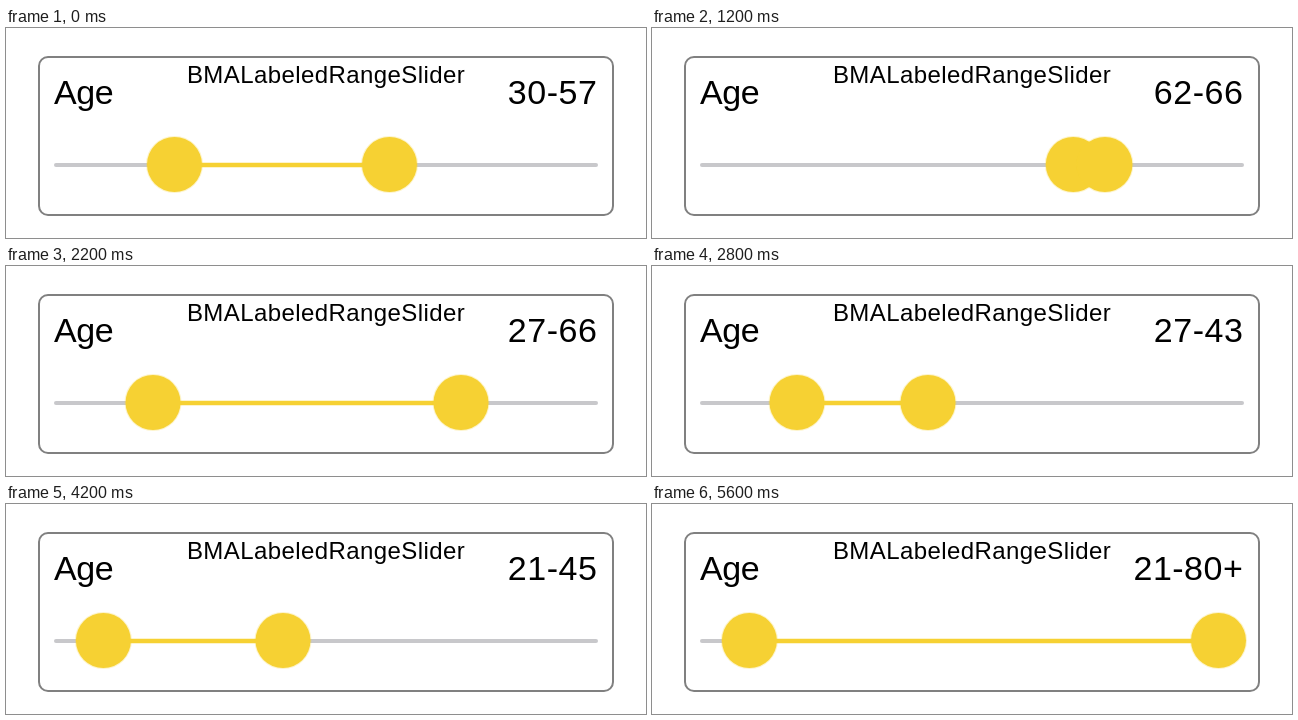
An HTML page that plays this animation: 640 by 210 pixels, repeating every 6 s.

```html
<!DOCTYPE html>
<html lang="en">
<head>
<meta charset="utf-8">
<title>Range slider</title>
<style>
  html, body { margin: 0; width: 100%; height: 100%; overflow: hidden; background: #fff; }
  svg { display: block; width: 100%; height: 100%; }
  text { font: 34px "Liberation Sans", Arial, Helvetica, sans-serif; letter-spacing: -.4px; }
  #title { font-size: 24px; letter-spacing: .42px; }
  #range { letter-spacing: .5px; text-anchor: end; }
  .fill { fill: #f6d133; stroke: #f6d133; stroke-width: 2; stroke-opacity: .25; paint-order: stroke; }
</style>
</head>
<body>
<svg viewBox="0 0 640 210">
  <rect x="33" y="29" width="574" height="158" rx="9" fill="none" stroke="#808080" stroke-width="2"/>
  <text id="title" x="180.9" y="55">BMALabeledRangeSlider</text>
  <text x="48" y="76">Age</text>
  <text id="range" x="591.3" y="76"></text>
  <rect x="48" y="135" width="544" height="4" rx="2" fill="#c8c8cb"/>
  <rect id="bar" class="fill" y="135" height="4"/>
  <circle id="low" class="fill" cy="136.5" r="27.5"/>
  <circle id="high" class="fill" cy="136.5" r="27.5"/>
</svg>
<script>
const LOOP = 6000, STEP = 100;
const GAP = 31.6;   // closest the thumbs get: one pushes the other
const LEAD = 30;    // the label runs slightly ahead of the thumbs, in ms

// A drag is a few points of time and x, joined by a smooth curve
const point = (t, x) => ({ t, x });
const lowDrag = [point(100, 168.5), point(200, 164.5), point(700, 364), point(1300, 423.5),
  point(1400, 423.5), point(1700, 291.5), point(2250, 145)];
const highDrag = [point(2250, 455), point(2800, 276), point(3600, 129), point(3800, 129),
  point(4200, 277), point(5000, 495.5), point(5600, 566.5)];

const slope = (p, q) => (q.x - p.x) / (q.t - p.t);

// Speed at point i: zero at turns and ends, else the harmonic mean of both sides
function speed(path, i) {
  if (i === 0 || i === path.length - 1) return 0;
  const a = slope(path[i - 1], path[i]), b = slope(path[i], path[i + 1]);
  return a * b > 0 ? 2 * a * b / (a + b) : 0;
}

function follow(path, t) {
  const next = path.findIndex(p => p.t > t);
  if (next === 0) return path[0].x;
  if (next < 0) return path.at(-1).x;
  const p = path[next - 1], q = path[next];
  const h = q.t - p.t, s = (t - p.t) / h, r = 1 - s;
  return p.x + (q.x - p.x) * s * s * (3 - 2 * s)
    + h * s * r * (r * speed(path, next - 1) - s * speed(path, next));
}

function thumbs(t) {
  let low = follow(lowDrag, t), high = follow(highDrag, t);
  if (t < 1400) high = Math.max(383.5, low + GAP);
  else low = Math.min(low, follow(highDrag, Math.min(t, 3800)) - GAP);
  return [low, high];
}

const age = x => Math.round(18 + (x - 73.6) / 7.95);
const $ = id => document.getElementById(id);
const range = $("range"), bar = $("bar"), lowThumb = $("low"), highThumb = $("high");

function draw(now) {
  const t = Math.floor(now % LOOP / STEP) * STEP;
  const [low, high] = thumbs(t);
  const [from, to] = thumbs(t + LEAD).map(age);
  lowThumb.setAttribute("cx", low);
  highThumb.setAttribute("cx", high);
  bar.setAttribute("x", low);
  bar.setAttribute("width", high - low);
  range.textContent = `${from}-${to < 80 ? to : "80+"}`;
}

let start;
function tick(now) {
  start ??= now;
  draw(now - start);
  requestAnimationFrame(tick);
}
draw(0);
requestAnimationFrame(tick);
</script>
</body>
</html>
```
